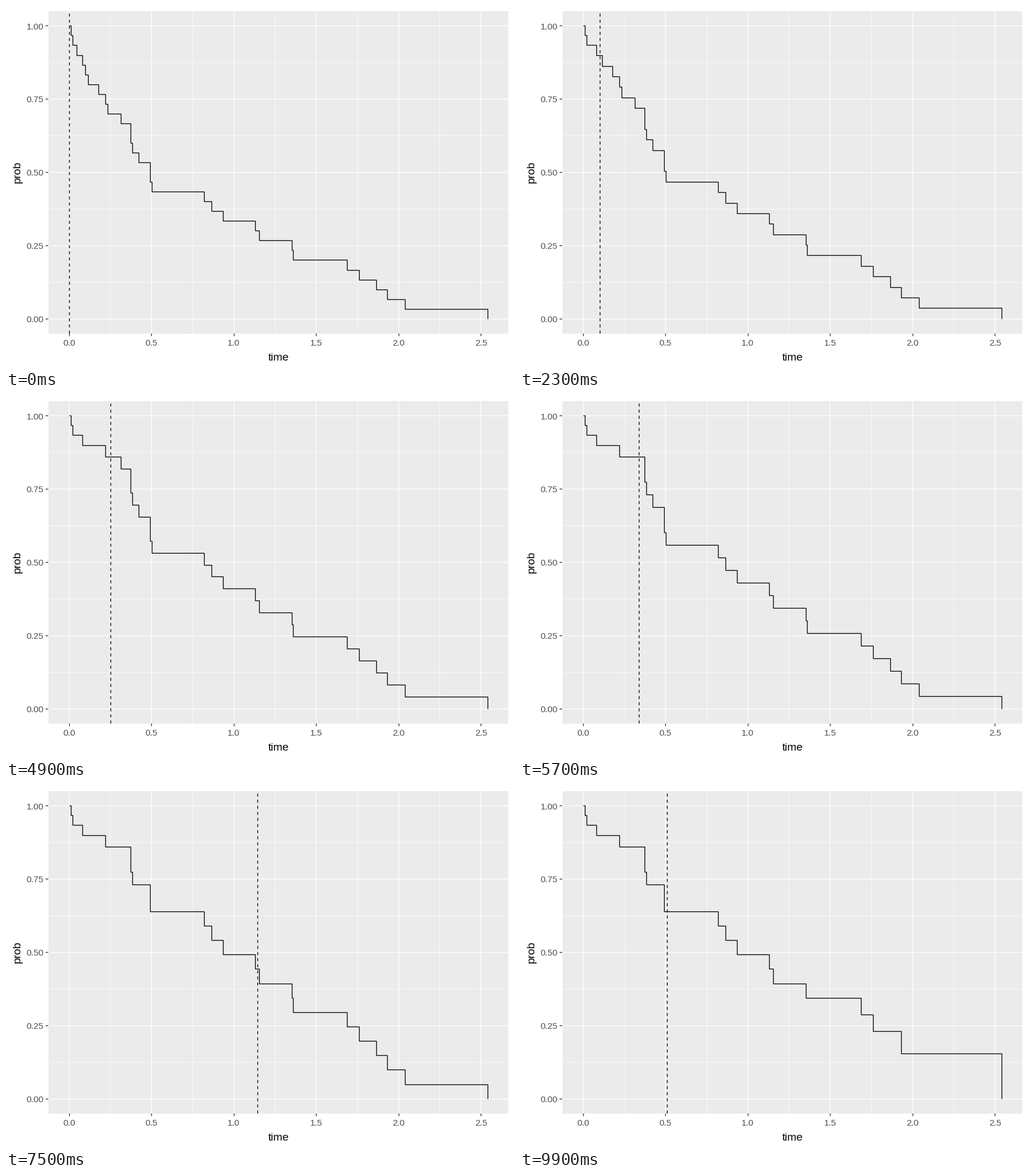
These frames come from a looping animation (885x632 px, 10 s). A matplotlib script:

```python
import math

import matplotlib.pyplot as plt
from matplotlib.animation import FuncAnimation
from matplotlib.patches import Rectangle

W, H, DPI = 885, 632, 100
PX = 72 / DPI  # points per pixel
LEFT, RIGHT, TOP, BOTTOM = 73.55, 875.45, 9.3, 571.8
PAD = 1 / 22  # ggplot's 5 % expansion, as a share of the panel
LINE, TICK = 1.33, 4.6
TITLE = 19.25
SMALL = 0.8 * TITLE
FRAMES, MOVE = 100, 4

plt.rcParams["font.family"] = "Liberation Sans"

# The sample: times of events and of censoring
EVENTS = [0.013, 0.023, 0.083, 0.22, 0.374, 0.374, 0.386, 0.493, 0.493, 0.822,
          0.865, 0.937, 1.131, 1.154, 1.352, 1.689, 1.76, 1.931, 2.54]
CENSORED = [0.0465, 0.098, 0.1155, 0.178, 0.2335, 0.314, 0.422, 0.502,
            1.359, 1.865, 2.041]
STOPS = [0] + CENSORED


def x_pos(time):
    span = RIGHT - LEFT
    return LEFT + span * (PAD + time / max(EVENTS) * (1 - 2 * PAD))


def y_pos(prob):
    span = BOTTOM - TOP
    return BOTTOM - span * (PAD + prob * (1 - 2 * PAD))


def crisp(values):
    return [math.floor(v) + 0.5 for v in values]


def survival(state):
    """Kaplan-Meier steps; censored times after `state` still count as events."""
    drops = sorted(EVENTS + CENSORED[state:])
    times = sorted(EVENTS + CENSORED)
    prob, xs, ys = 1.0, [0], [1.0]
    for i, t in enumerate(times):
        if t in drops:
            at_risk = len(times) - i
            xs += [t, t]
            ys += [prob, prob * (at_risk - 1) / at_risk]
            prob = ys[-1]
    return crisp(map(x_pos, xs)), crisp(map(y_pos, ys))


def start(state):
    """First frame at which the marker rests on a stop."""
    return 8 * state + min(max(state - 1, 0), 4)


CURVES = [survival(k) for k in range(len(STOPS))]

fig = plt.figure(figsize=(W / DPI, H / DPI), dpi=DPI, facecolor="white")
ax = fig.add_axes([0, 0, 1, 1])
ax.set_xlim(0, W)
ax.set_ylim(H, 0)
ax.axis("off")


def stroke(xs, ys, color, width=LINE, **kw):
    line, = ax.plot(xs, ys, color=color, lw=width * PX,
                    solid_capstyle="butt", solid_joinstyle="miter", **kw)
    line.set_snap(False)
    return line


def v_line(x, top, bottom, color, width=LINE):
    stroke(crisp([x, x]), [top, bottom], color, width)


def h_line(y, left, right, color, width=LINE):
    stroke([left, right], crisp([y, y]), color, width)


def label(x, y, text, size, color, ha="center", **kw):
    ax.text(x, y, text, fontsize=size * PX, color=color, ha=ha,
            va="baseline", rotation_mode="anchor", **kw)


ax.add_patch(Rectangle((LEFT, TOP), RIGHT - LEFT, BOTTOM - TOP,
                       fc="#EBEBEB", ec="none", zorder=0))

for i in range(5):
    v_line(x_pos(0.25 + 0.5 * i), TOP, BOTTOM, "white", LINE / 2)
for i in range(4):
    h_line(y_pos(0.125 + 0.25 * i), LEFT, RIGHT, "white", LINE / 2)

for i in range(6):
    x = x_pos(0.5 * i)
    v_line(x, TOP, BOTTOM, "white")
    v_line(x, BOTTOM, BOTTOM + TICK, "#333333")
    label(x, 593, f"{0.5 * i:.1f}", SMALL, "#4D4D4D")
for i in range(5):
    y = y_pos(0.25 * i)
    h_line(y, LEFT, RIGHT, "white")
    h_line(y, LEFT - TICK, LEFT, "#333333")
    label(65.5, y + 5.7, f"{0.25 * i:.2f}", SMALL, "#4D4D4D", ha="right")

label((LEFT + RIGHT) / 2, 618.7, "time", TITLE, "black")
label(25, 290, "prob", TITLE, "black", rotation=90)

curve = stroke(*CURVES[0], "black", zorder=3)
marker = stroke([0, 0], [BOTTOM, TOP], "black", zorder=4,
                linestyle=(0, (4, 4)), dash_capstyle="butt")


def draw(frame):
    state = max(k for k in range(len(STOPS)) if start(k) <= frame)
    a, b = STOPS[state], STOPS[(state + 1) % len(STOPS)]
    part = max(0, frame - (start(state + 1) - MOVE)) / MOVE
    x = x_pos(a + (b - a) * part)
    curve.set_data(*CURVES[state])
    marker.set_data(crisp([x, x]), [BOTTOM, TOP])
    return curve, marker


anim = FuncAnimation(fig, draw, frames=FRAMES, interval=100, repeat=True,
                     repeat_delay=0, init_func=lambda: draw(0))
plt.show()
```
